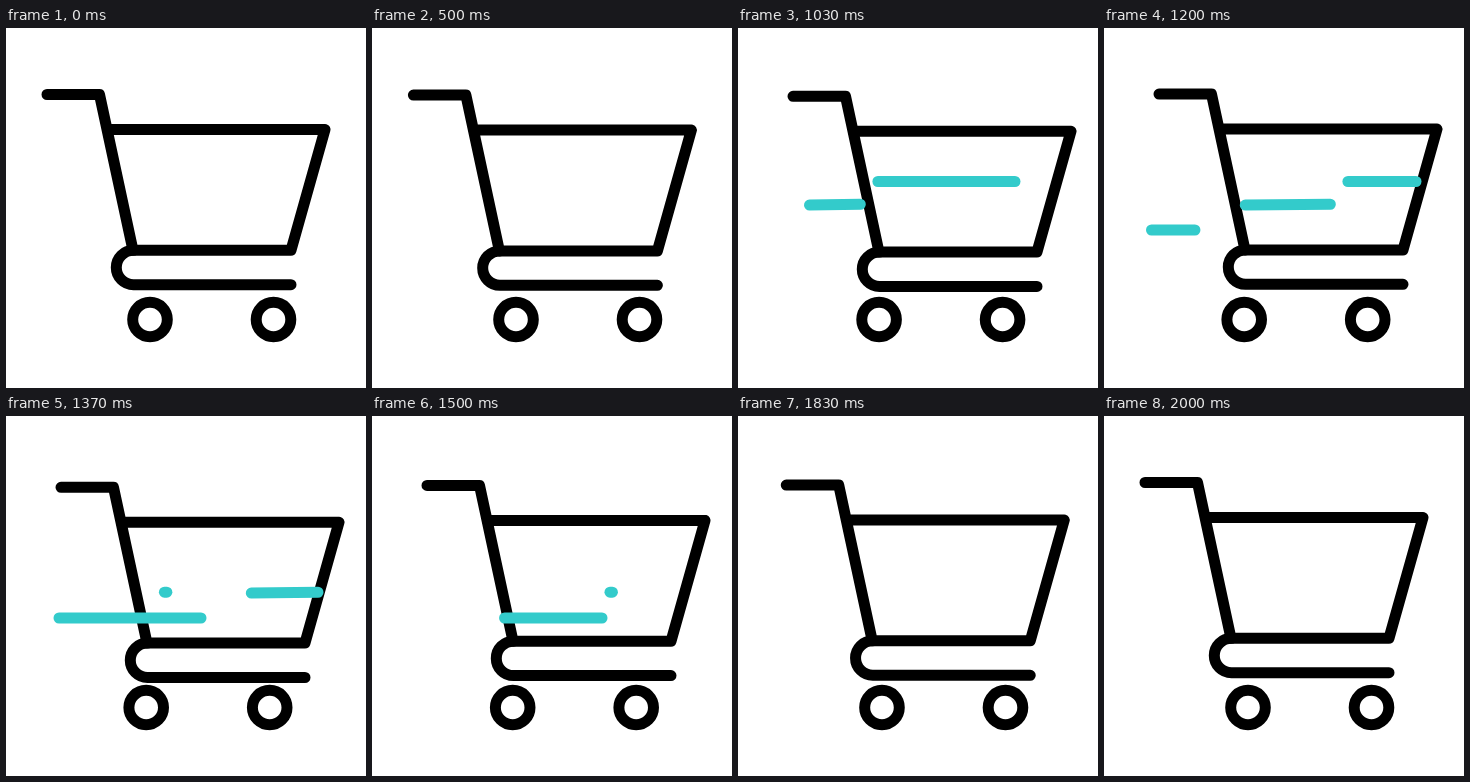
An HTML page for the animation above (2.5 s loop, 360x360 px).

```html
<!DOCTYPE html>
<html lang="en">
<head>
<meta charset="utf-8">
<title>Shopping cart</title>
<style>
  html, body { margin: 0; width: 100%; height: 100%; overflow: hidden; background: #fff; }
  svg { display: block; width: 100vw; height: 100vh; }
  g, line { fill: none; stroke-width: 11; stroke-linecap: round; stroke-linejoin: round; }
  g { stroke: #000; }
</style>
</head>
<body>
<svg id="stage" viewBox="0 0 360 360">
  <g id="cart">
    <path d="M41 66.5H93.5L127 222.3H285L319 101.5H104"/>
    <path d="M127.500 222.300A17.200 17.200 0 0 0 127.500 256.700H285"/>
  </g>
  <g id="wheels">
    <circle cx="144" cy="291.500" r="17.300"/>
    <circle cx="267.500" cy="291.500" r="17.300"/>
  </g>
</svg>
<script>
const LOOP = 2500, MOVE_START = 500, MOVE_END = 2000;
const SPEED = 0.612; // px per ms
const stage = document.getElementById('stage');
const cart = document.getElementById('cart');
const wheels = document.getElementById('wheels');

// Each streak grows from its left end, then its tail follows to the right end.
const streaks = [
  { y: 153.5, from: 99.5, to: 312, headAt: 741, tailAt: 965, tilt: 0 },
  { y: 176.7, from: 71.5, to: 312, headAt: 948, tailAt: 1087, tilt: 0.4 },
  { y: 176.2, from: 71.5, to: 312, headAt: 1225, tailAt: 1229, tilt: 0 },
  { y: 202, from: 47.5, to: 230, headAt: 1130, tailAt: 1362, tilt: 0 }
];
for (const s of streaks) {
  s.el = document.createElementNS('http://www.w3.org/2000/svg', 'line');
  stage.append(s.el);
}

const clamp = (v, lo, hi) => Math.min(hi, Math.max(lo, v));
const mix = (a, b, p) => a + (b - a) * p;
function smooth(t, start, end) {
  const p = clamp((t - start) / (end - start), 0, 1);
  return p * p * (3 - 2 * p);
}

function place(el, x, y) {
  el.setAttribute('transform', `translate(${x.toFixed(2)} ${y.toFixed(2)})`);
}

function drawStreak(s, t, color) {
  const reach = start => clamp(s.from + (t - start) * SPEED, s.from, s.to);
  const head = reach(s.headAt), tail = reach(s.tailAt);
  const { style } = s.el;
  style.display = head > tail ? '' : 'none';
  style.stroke = color;
  s.el.setAttribute('x1', tail);
  s.el.setAttribute('x2', head);
  s.el.setAttribute('y1', s.y + s.tilt);
  s.el.setAttribute('y2', s.y - s.tilt);
}

function render(t) {
  const moving = t >= MOVE_START && t < MOVE_END;
  const shift = moving ? 14 * (smooth(t, 470, 780) - smooth(t, 1670, 2000)) : 0;
  const roll = moving ? -3.8 * (smooth(t, 770, 1150) - smooth(t, 1400, 1850)) : 0;
  const strength = moving ? smooth(t, 440, 650) * (1 - smooth(t, 1720, 2000)) : 0;
  const bob = strength * (2 + 3 * Math.cos((t - 900) / 500 * 2 * Math.PI));
  place(cart, shift, bob);
  place(wheels, roll, 0);

  const p = smooth(t, 770, 1030);
  const color = `rgb(${mix(91, 51, p)}, ${mix(187, 203, p)}, ${mix(185, 203, p)})`;
  streaks.forEach(s => drawStreak(s, t, color));
}

const begin = performance.now();
function frame() {
  render((performance.now() - begin) % LOOP);
  requestAnimationFrame(frame);
}
frame();
</script>
</body>
</html>
```
